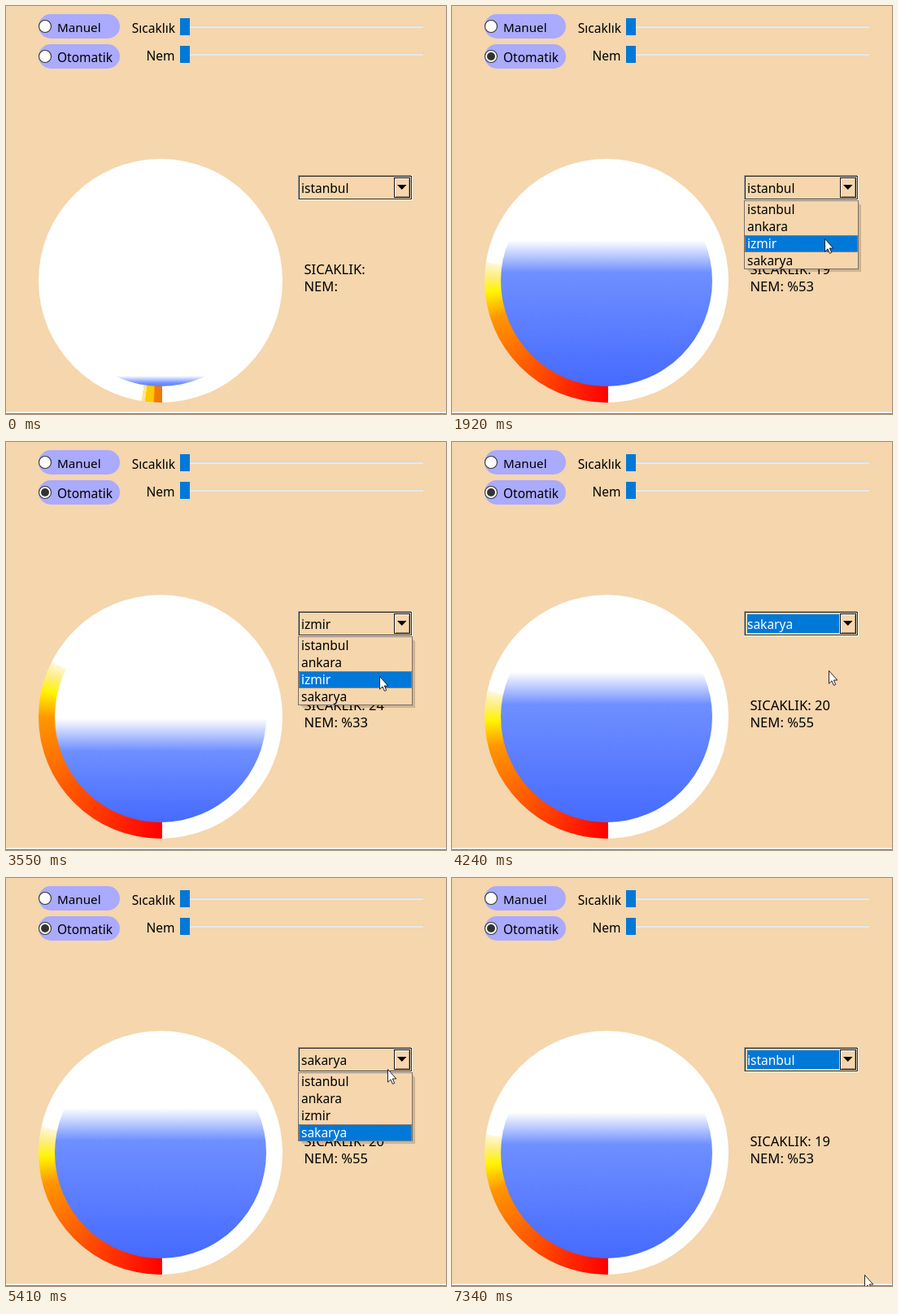
An HTML page that plays this animation: 541x502 px, repeating every 7410 ms.

```html
<!DOCTYPE html>
<html lang="tr">
<head>
<meta charset="utf-8">
<title>Sıcaklık ve nem</title>
<style>
  html, body { margin: 0; width: 100%; height: 100%; overflow: hidden; background: #f5d6ad; }
  #stage { position: relative; width: 541px; height: 502px; overflow: hidden; background: #f5d6ad; }
  #ring { position: absolute; left: 40px; top: 188px; width: 300px; height: 300px; border-radius: 50%; }
  #water { position: absolute; inset: 20px; border-radius: 50%; }
  svg { position: absolute; left: 0; top: 0; }
  text { font: 15.5px "Noto Sans", "Open Sans", sans-serif; fill: #000; white-space: pre; }
  .data text { font-size: 16.6px; }
  .crisp { shape-rendering: crispEdges; }
</style>
</head>
<body>
<div id="stage">
  <div id="ring"><div id="water"></div></div>
  <svg width="541" height="502" viewBox="0 0 541 502">
    <g fill="#aaaaff">
      <rect x="40" y="10" width="100" height="30" rx="15"/>
      <rect x="40" y="47" width="100" height="30" rx="15"/>
    </g>
    <g fill="#fff" stroke="#333" stroke-width="1.1">
      <circle cx="48" cy="25" r="7.5"/>
      <circle cx="48" cy="62" r="7.5"/>
    </g>
    <circle id="dot" cx="48" cy="62" r="5" fill="#333"/>
    <text x="63" y="31.5" style="font-size:15.2px">Manuel</text>
    <text x="63" y="68.5">Otomatik</text>
    <text x="208" y="32.5" text-anchor="end">Sıcaklık</text>
    <text x="207.5" y="66.5" text-anchor="end">Nem</text>

    <g class="crisp">
      <path d="M214 24.5H513M214 58.5H513" stroke="#d6d6d6"/>
      <path d="M214 26H513M214 60H513" stroke="#e7eaea" stroke-width="2"/>
      <path d="M214 15h12v21h-12zM214 49h12v21h-12z" fill="#0078d7"/>
    </g>

    <g class="data">
      <text id="temp" x="366.5" y="330"></text>
      <text id="hum" x="366.5" y="351"></text>
    </g>

    <g class="crisp" fill="none">
      <path d="M359.5 238V208.5H498" stroke="#a0a0a0"/>
      <path d="M360 238.5H499.5V208" stroke="#fff"/>
      <rect x="360.5" y="209.5" width="138" height="28" stroke="#2b2b2b"/>
      <rect id="mark" x="363" y="212" width="113" height="23" fill="#0078d7"/>
      <rect x="477.5" y="211.5" width="19" height="24" stroke="#111" fill="#f5d6ad"/>
      <path d="M478.5 235V212.5H496" stroke="#fff"/>
      <path d="M479 234.5H495.5V213" stroke="#a09078"/>
    </g>
    <path d="M481 220h11.5l-5.75 6z"/>
    <text id="value" x="363" y="229.5"></text>

    <g id="popup">
      <g fill="#000" fill-opacity=".16" class="crisp">
        <path d="M363 243h138v82H363zM364 244h138v82H364zM365 245h138v82H365z"/>
      </g>
      <rect x="359.5" y="239.5" width="140" height="84" fill="#f5d6ad" stroke="#787068"/>
      <g id="bar" class="crisp">
        <rect x="360" y="0" width="139" height="21" fill="#0078d7"/>
        <rect x="360.5" y=".5" width="138" height="20" fill="none" stroke="#ff8728" stroke-dasharray="1 1"/>
      </g>
      <g id="items"></g>
    </g>

    <g class="crisp">
      <path d="M0 499.5H541" stroke="#f6efe4"/>
      <path d="M0 500.5H541" stroke="#fff"/>
      <path d="M0 501.5H541" stroke="#7c7c78"/>
    </g>
    <path id="cursor" d="M.5 .5V16.2L4 12.9 6.4 18.4 8.7 17.4 6.3 12H10.8z" fill="#fff" stroke="#111" stroke-width=".9"/>
  </svg>
</div>
<script>
const LOOP = 7410;
const cities = [
  { name: "istanbul", temp: 19, hum: 53 },
  { name: "ankara" },
  { name: "izmir", temp: 24, hum: 33 },
  { name: "sakarya", temp: 20, hum: 55 }
];
// time, city index
const picks = [[470, 0], [2250, 2], [3970, 3], [6730, 0]];
// popup open and close times
const opens = [[1440, 2120], [3210, 3900], [5140, 5940]];
// start, end, step count, x, y
const moves = [
  [70, 270, 4, 50, 58],
  [540, 1170, 10, 490, 221],
  [1510, 1850, 6, 458, 286],
  [2320, 2940, 10, 488, 222],
  [3280, 3550, 5, 459, 288],
  [3620, 3760, 3, 456, 308],
  [4040, 4660, 9, 478, 228],
  [4730, 4870, 3, 482, 221],
  [5210, 5610, 7, 459, 245],
  [6200, 6270, 2, 466, 245],
  [6800, 7340, 8, 507, 488]
];

const $ = id => document.getElementById(id);
const [ring, water, dot, temp, hum, mark, value, popup, bar, items, cursor] =
  ["ring", "water", "dot", "temp", "hum", "mark", "value", "popup", "bar", "items", "cursor"].map($);

const rows = cities.map((c, i) => {
  const row = document.createElementNS("http://www.w3.org/2000/svg", "text");
  row.setAttribute("x", 363);
  row.setAttribute("y", 255.5 + 21 * i);
  row.textContent = c.name;
  return items.appendChild(row);
});

const show = (el, on) => { el.style.display = on ? "" : "none"; };

function pointer(t) {
  let x = 530, y = 508;
  for (const [start, end, n, tx, ty] of moves) {
    if (t < start) break;
    const step = Math.floor((t - start) / (end - start) * (n - 1) + 1.001);
    const p = Math.min(1, step / n);
    x += (tx - x) * p;
    y += (ty - y) * p;
    if (p < 1) break;
  }
  return [Math.round(x), Math.round(y)];
}

function ringFill(city) {
  const from = "conic-gradient(from 179.2deg, ";
  if (!city) {
    return from + "#ee7a00 3.6deg, #ffc800 4.4deg 8deg, #fbe39a 8.2deg 9.8deg, #fff 9.9deg)";
  }
  const b = city.temp * 3.6;
  return from + `#f00 0deg, #ff9600 ${b + 4}deg, #fff500 ${b + 17}deg, ` +
    `#fdee78 ${b + 24}deg, #fff7d7 ${b + 31}deg, #fff ${b + 31.2}deg)`;
}

function waterFill(city) {
  if (!city) return "linear-gradient(#fff 247px, #6e8fff 256px, #5f82ff 260px)";
  const top = 258 - 2.6 * city.hum;
  return `linear-gradient(#fff ${top - 40}px, #6e8fff ${top}px, #466aff 260px)`;
}

let shown;
function setCity(city) {
  if (city === shown) return;
  shown = city;
  ring.style.background = ringFill(city);
  water.style.background = waterFill(city);
  temp.textContent = "SICAKLIK:" + (city ? " " + city.temp : "");
  hum.textContent = "NEM:" + (city ? " %" + city.hum : "");
  value.textContent = (city || cities[0]).name;
}

function draw(t) {
  const pick = picks.filter(p => t >= p[0]).pop();
  const index = pick ? pick[1] : 0;
  setCity(pick ? cities[index] : null);
  show(dot, pick);

  const [x, y] = pointer(t);
  show(cursor, t >= 70);
  cursor.setAttribute("transform", `translate(${x} ${y})`);

  const open = opens.some(([a, b]) => t >= a && t < b);
  show(popup, open);
  const hover = y >= 240 ? Math.min(3, Math.floor((y - 240) / 21)) : index;
  bar.setAttribute("transform", `translate(0 ${240 + 21 * hover})`);
  rows.forEach((row, i) => { row.style.fill = i === hover ? "#fff" : "#000"; });

  // The field stays marked from a new pick until the list opens again.
  const lastOpen = opens.filter(o => t >= o[0]).pop();
  const marked = Boolean(lastOpen && pick[0] > lastOpen[0]);
  show(mark, marked);
  value.style.fill = marked ? "#fff" : "#000";
}

const begin = performance.now();
function tick() {
  draw((performance.now() - begin) % LOOP);
  requestAnimationFrame(tick);
}
tick();
</script>
</body>
</html>
```
